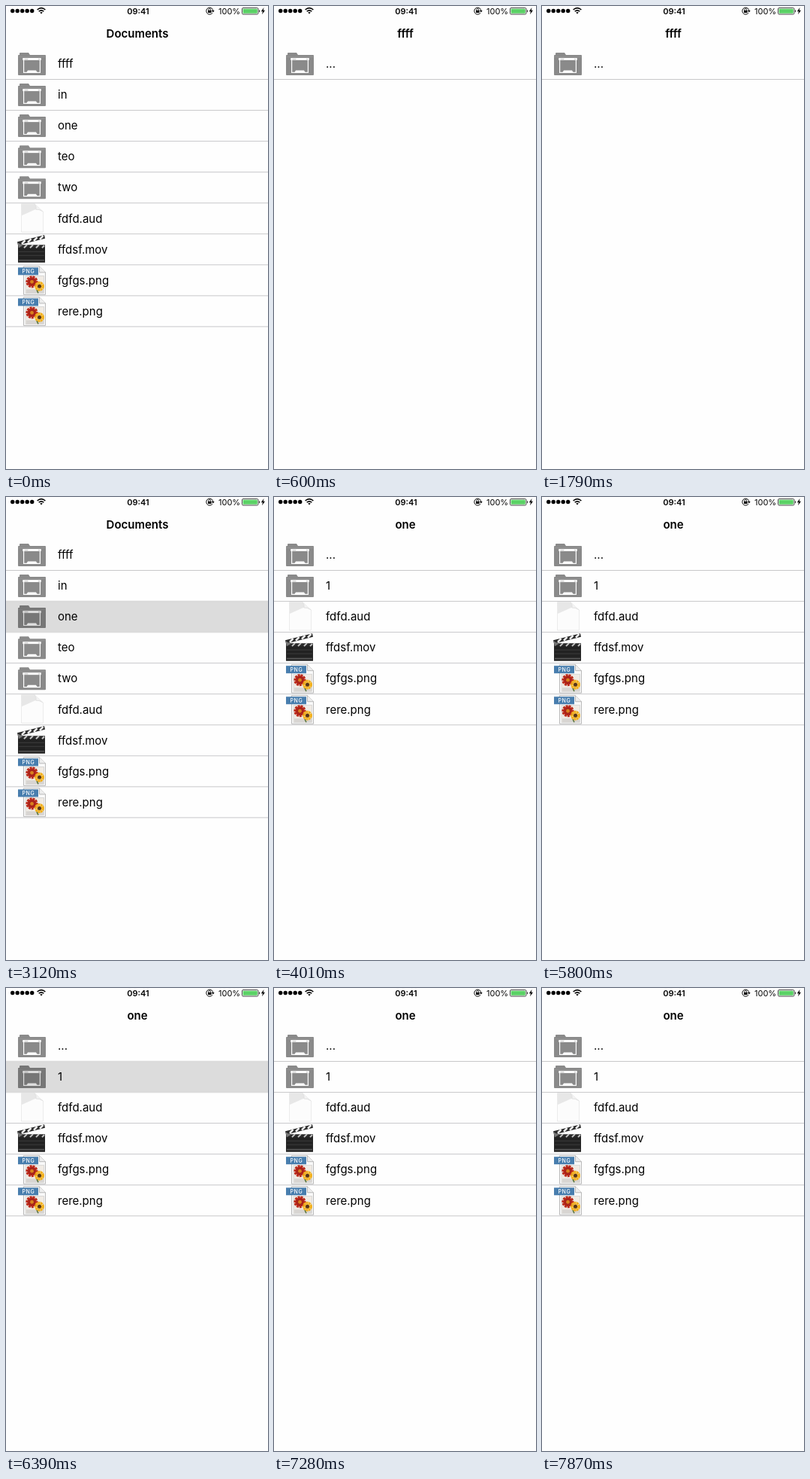
These frames come from a looping animation (349x615 px, 8000 ms). An HTML page:

```html
<!DOCTYPE html>
<html lang="en">
<head>
<meta charset="utf-8">
<title>File browser</title>
<style>
  html, body { margin: 0; width: 100%; height: 100%; overflow: hidden; background: #fefefe; }
  svg { display: block; }
  text { font: 15px Inter, "Liberation Sans", sans-serif; fill: #000; }
  .title { font-weight: 600; text-anchor: middle; }
  .status { font-size: 11px; }
  .clock { font-weight: 600; text-anchor: middle; }
  .tag { font-size: 7px; font-weight: 500; letter-spacing: .6px; fill: #fff; }
  .view, #tap { animation: 8s step-end infinite; opacity: 0; }
  #home { animation-name: home; }
  #empty { animation-name: empty; }
  #sub { animation-name: sub; }
  #tap { animation-name: tap; }
  @keyframes home { 0%, 27.875% { opacity: 1 } 5.625%, 40.875%, 100% { opacity: 0 } }
  @keyframes empty { 0%, 27.875%, 100% { opacity: 0 } 5.625% { opacity: 1 } }
  @keyframes sub { 0% { opacity: 0 } 40.875%, 100% { opacity: 1 } }
  @keyframes tap {
    0%, 5.625%, 27.875% { opacity: 0; transform: none }
    3.75%, 26% { opacity: 1; transform: none }
    39% { opacity: 1; transform: translateY(82px) }
    40.875% { opacity: 0; transform: translateY(82px) }
    61.25%, 79.875%, 94.625% { opacity: 1; transform: translateY(41px) }
    63.125%, 81.75%, 96.5% { opacity: 1; transform: translateY(41px); animation-timing-function: linear }
    66.8%, 85.5%, 98.3% { opacity: 0; transform: translateY(41px) }
    68.75% { opacity: 1; transform: translateY(82px) }
    70.625% { opacity: 1; transform: translateY(82px); animation-timing-function: linear }
    72.5%, 100% { opacity: 0; transform: translateY(82px) }
  }
</style>
</head>
<body>
<svg width="349" height="615" viewBox="0 0 349 615">
  <defs>
    <g id="folder">
      <path d="M16 10Q16 9 17 9H18V7Q18 6 19 6H30L32 9H52Q53 9 53 10V35Q53 36 52 36H17Q16 36 16 35Z" fill="#8a8a8a"/>
      <path d="M16 11.5H53" stroke="#979797" stroke-width=".7"/>
      <path d="M23.6 15V32.4H45.4V15" fill="none" stroke="#fff" stroke-width="1.2"/>
      <path d="M22.3 14.5H46.7" stroke="#fff" stroke-width="3"/>
      <path d="M24.5 14.7H29.5M43 14.7H45" stroke="#aaa" stroke-width=".8"/>
      <path d="M27.5 32L29 29.5H40L41.5 32Z" fill="#fff"/>
    </g>
    <g id="aud">
      <path d="M20.5 1.5H38L49.5 12V39H20.5Z" fill="#fcfcfc" stroke="#e6e6e6" stroke-width=".8"/>
      <path d="M20.5 1.5H38L49 12Q44 9 39 9L21 17Z" fill="#e7e7e7"/>
      <path d="M38 1.5Q41 5 40 9Q45 8 49.5 12" fill="#f3f3f3" stroke="#dadada" stroke-width=".6"/>
    </g>
    <g id="mov">
      <path d="M16 16H52V38.5H16Z" fill="#222"/>
      <path d="M17 24H51M17 29H51" stroke="#3c3c3c"/>
      <path d="M17 35.5H51" stroke="#555" stroke-width="1.6"/>
      <path d="M15 11L51 2L52 6.5L16 15.5Z" fill="#2a2a2a"/>
      <path d="M21 13.5L25.5 9M29 11.5L33.5 7M37 9.5L41.5 5M45 7.5L49.5 3" stroke="#eee" stroke-width="2.6"/>
      <path d="M16 15H52V19H16Z" fill="#2a2a2a"/>
      <path d="M24 19L28 15M32 19L36 15M40 19L44 15M48 19L51 16" stroke="#c4c4c4" stroke-width="2"/>
      <path d="M15.5 12L22 16L17 19Z" fill="#777"/>
    </g>
    <g id="png">
      <path d="M23.5 2.5H44.5L52.5 10.5V40H23.5Z" fill="#fafafa" stroke="#a9a9a9" stroke-width=".8"/>
      <path d="M44.5 2.5V10.5H52.5" fill="#eee" stroke="#a9a9a9" stroke-width=".8"/>
      <rect x="26" y="15" width="24.5" height="23" fill="#f0ebe4" stroke="#c9c9c9" stroke-width=".6"/>
      <path d="M27 33H50V38H27Z" fill="#d8d5d2"/>
      <circle cx="34.5" cy="23" r="6.2" fill="#a8231a"/>
      <circle cx="34.5" cy="23" r="6.4" fill="none" stroke="#bd2a1b" stroke-width="3.4" stroke-dasharray="2.8 1"/>
      <circle cx="34.5" cy="23" r="2.4" fill="#d9821e"/>
      <circle cx="44.5" cy="29" r="4.3" fill="none" stroke="#f2b01c" stroke-width="4.4" stroke-dasharray="2.6 .4"/>
      <circle cx="44.5" cy="29" r="2.5" fill="#57351a"/>
      <path d="M41 34L43 38" stroke="#59753a" stroke-width="1.5"/>
      <rect x="16" y="4" width="27" height="10" fill="#487eae"/>
      <text class="tag" x="21.5" y="11.6">PNG</text>
    </g>
  </defs>

  <g id="views"></g>
  <g id="tap">
    <rect y="56" width="349" height="41" fill="#000" fill-opacity=".135"/>
    <path d="M0 56.5H349M0 97.5H349" stroke="#dbdbdb" stroke-width="1.3"/>
  </g>

  <g id="signal"></g>
  <g fill="none" stroke="#000" stroke-width="1.6">
    <path d="M41.6 5Q47 .4 52.4 5M43.7 7.2Q47 4.4 50.3 7.2"/>
    <path d="M45.2 8.6Q47 7.2 48.8 8.6L47 10.6Z" fill="#000" stroke="none"/>
    <path d="M275 9.2A4.5 4.5 0 1 1 275.8 6.5" stroke-width="1"/>
    <path d="M274 6H277.6L275.8 8.4Z" fill="#000" stroke="none"/>
    <path d="M269.8 6V5A1.5 1.5 0 0 1 272.8 5V6" stroke-width=".8"/>
    <path d="M269 5.8H273.6V9H269Z" fill="#000" stroke="none"/>
  </g>
  <text class="status clock" x="176" y="10.5">09:41</text>
  <text class="status" x="283" y="10.5">100%</text>
  <rect x="314.5" y="2.5" width="21.5" height="8.5" rx="1.5" fill="#fff" stroke="#333" stroke-width=".9"/>
  <rect x="315.7" y="3.7" width="19.1" height="6.1" rx=".6" fill="#5bd266"/>
  <path d="M337 5V8.5Q338.2 8 338.2 6.75T337 5Z" fill="#333"/>
  <path d="M343.5 2L339.8 7.2H342L341 11.2L345 5.8H342.7Z"/>
</svg>
<script>
  const pitch = 41.05;
  const files = ["fdfd.aud", "ffdsf.mov", "fgfgs.png", "rere.png"];
  const views = [
    ["home", "Documents", ["ffff", "in", "one", "teo", "two", ...files]],
    ["empty", "ffff", ["..."]],
    ["sub", "one", ["...", "1", ...files]]
  ];

  const row = (name, i) => {
    const icon = files.includes(name) ? name.split(".")[1] : "folder";
    return `<g transform="translate(0 ${56 + pitch * i})">
      <use href="#${icon}"/><text x="69" y="26.3">${name}</text>
      <path d="M0 41.5H349" stroke="#c8c8ca"/></g>`;
  };

  document.getElementById("views").innerHTML = views.map(([id, title, names]) =>
    `<g class="view" id="${id}"><text class="title" x="175" y="42">${title}</text>${names.map(row).join("")}</g>`
  ).join("");

  document.getElementById("signal").innerHTML = [0, 1, 2, 3, 4].map(i =>
    `<circle cx="${8.7 + 6.5 * i}" cy="6.5" r="2.7"/>`).join("");
</script>
</body>
</html>
```
